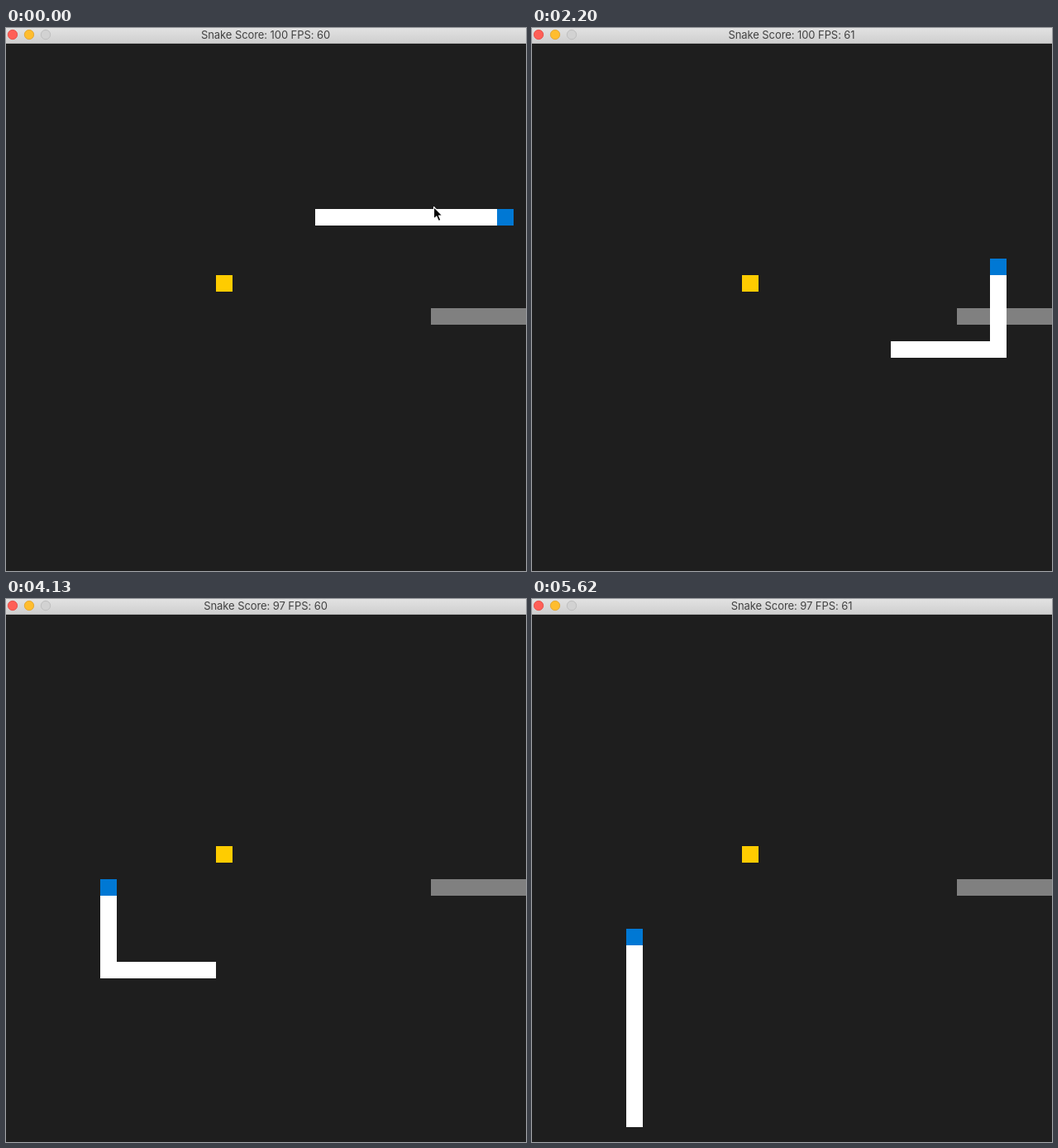
An HTML page with a canvas that plays this animation: 629x657 px, repeating every 5720 ms.

```html
<!DOCTYPE html>
<html lang="en">
<head>
<meta charset="utf-8">
<title>Snake</title>
<style>
  html, body { margin: 0; width: 100%; height: 100%; overflow: hidden; background: #1e1e1e; }
  canvas { display: block; }
</style>
</head>
<body>
<canvas id="stage" width="629" height="657"></canvas>
<script>
const ctx = document.getElementById('stage').getContext('2d');
const LOOP = 5720, CELL = 20, GRID = 32, LEFT = -6, TOP = 19, BODY = 11;

// Moments at which the picture refreshes: 150 ms apart, a few 140 ms
const SHORT = [0, 3, 6, 8, 10, 21, 27, 34];
const ticks = [0];
for (let i = 0; i < 38; i++) ticks.push(ticks[i] + (SHORT.includes(i) ? 140 : 150));

// Legs of the route: dx, dy, number of moves
const LEGS = [
  [1, 0, 31], [0, 1, 8], [1, 0, 10], [0, -1, 7],
  [-1, 0, 14], [0, 1, 10], [-1, 0, 8], [0, -1, 40]
];
const route = [[19, 10]];
for (const [dx, dy, count] of LEGS) {
  for (let i = 0; i < count; i++) {
    const [x, y] = route[route.length - 1];
    route.push([(x + dx + GRID) % GRID, (y + dy + GRID) % GRID]);
  }
}

// Moves made by time t; the game drops one move late in the loop
const movesAt = t => Math.max(0, Math.floor((t - 5) / 50)) - (t >= 5170 ? 1 : 0);

const TITLES = [[0, 100, 60], [1600, 100, 61], [2650, 97, 60], [5620, 97, 61]];
const CURSOR = [[0, 517, 216], [140], [5170, 577, 588], [5320, 590, 60], [5470]];
const latest = (steps, t) => steps.filter(s => s[0] <= t).pop();

function cell(col, row, color, wide = 1) {
  ctx.fillStyle = color;
  ctx.fillRect(LEFT + col * CELL, TOP + row * CELL, wide * CELL, CELL);
}

function light(x, fill, edge) {
  ctx.beginPath();
  ctx.arc(x, 8, 5.7, 0, Math.PI * 2);
  ctx.fillStyle = fill;
  ctx.fill();
  ctx.strokeStyle = edge;
  ctx.lineWidth = 0.8;
  ctx.stroke();
}

function titleBar(score, fps) {
  const shade = ctx.createLinearGradient(0, 0, 0, 18);
  shade.addColorStop(0, '#e2e2e2');
  shade.addColorStop(1, '#cfcfcf');
  ctx.fillStyle = shade;
  ctx.fillRect(0, 0, 629, 18);
  ctx.fillStyle = '#b8b8b8';
  ctx.fillRect(0, 18, 629, 1);
  light(8, '#ff5f57', '#e2463f');
  light(28, '#ffbd2e', '#e0a028');
  light(48, '#d2d2d2', '#b9b9b9');
  ctx.font = '13px Inter, "Open Sans", sans-serif';
  ctx.letterSpacing = '-0.08px';
  ctx.textAlign = 'center';
  ctx.fillStyle = '#424242';
  ctx.fillText(`Snake Score: ${score} FPS: ${fps}`, 314, 13);
}

function pointer(x, y) {
  ctx.save();
  ctx.translate(x + 0.5, y + 0.5);
  const arrow = new Path2D('M0 0V14.5L3.4 11.4L5.7 17L8.3 15.9L6 10.6H10.4Z');
  ctx.lineJoin = 'round';
  ctx.fillStyle = '#000';
  ctx.fill(arrow);
  ctx.strokeStyle = '#fff';
  ctx.lineWidth = 1.1;
  ctx.stroke(arrow);
  ctx.restore();
}

function draw(t) {
  ctx.fillStyle = '#1e1e1e';
  ctx.fillRect(0, 0, 629, 657);
  cell(26, 16, '#808080', 6);
  cell(13, 14, '#ffcc00');
  const tail = movesAt(t);
  for (let i = 0; i <= BODY; i++) {
    cell(...route[tail + i], i === BODY ? '#0078d4' : '#fff');
  }
  const [, score, fps] = latest(TITLES, t);
  titleBar(score, fps);
  const [, x, y] = latest(CURSOR, t);
  if (x !== undefined) pointer(x, y);
}

const start = performance.now();
function loop() {
  const t = (performance.now() - start) % LOOP;
  draw(ticks.filter(tick => tick <= t).pop());
  requestAnimationFrame(loop);
}
loop();
</script>
</body>
</html>
```
